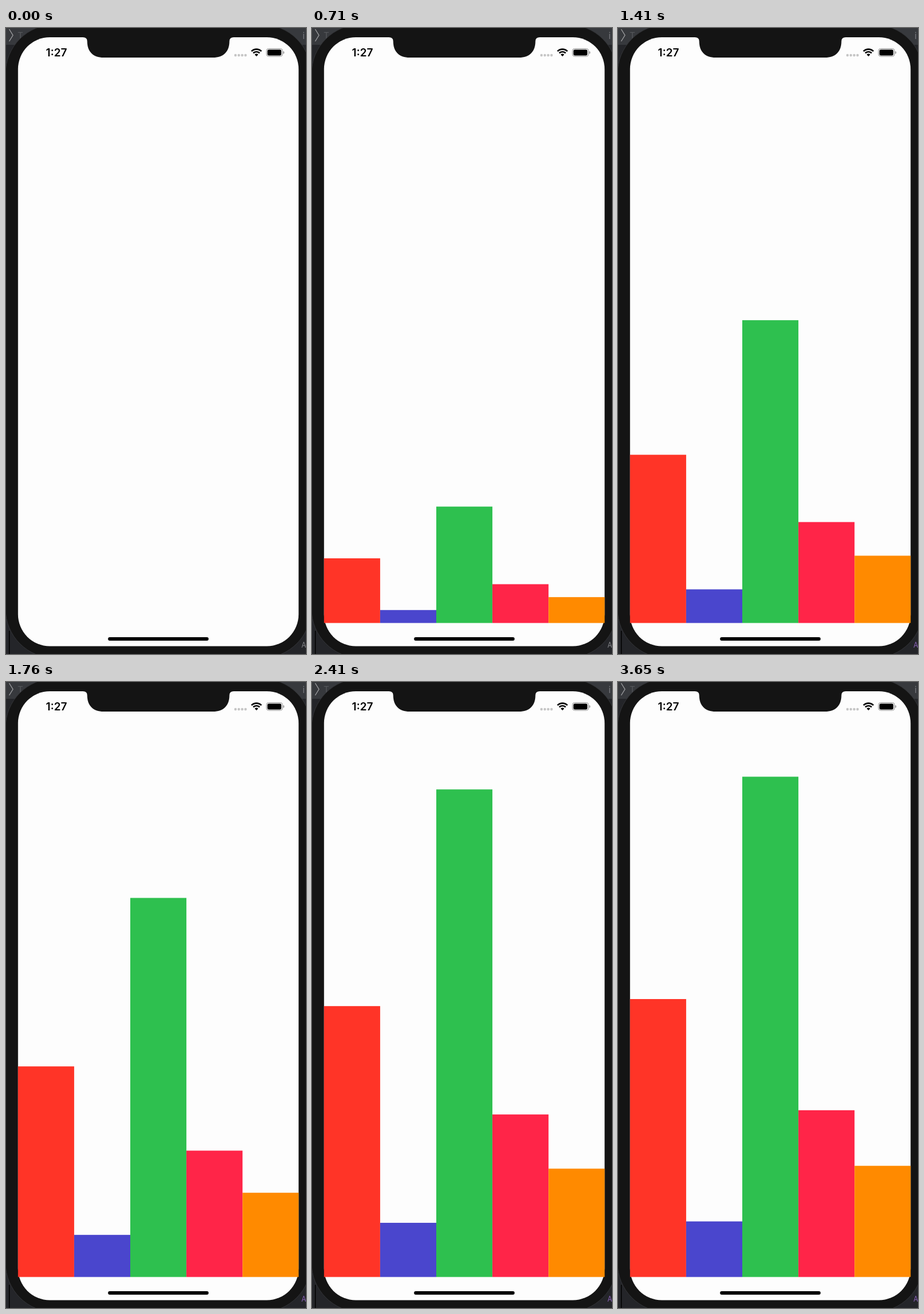
An HTML page with a canvas for the animation above (3.71 s loop, 519x1080 px).

```html
<!DOCTYPE html>
<html lang="en">
<head>
<meta charset="utf-8">
<title>Growing bars</title>
<style>
  html, body { margin: 0; width: 100%; height: 100%; overflow: hidden; background: #141414; }
  canvas { display: block; width: 519px; height: 1080px; }
</style>
</head>
<body>
<canvas id="stage" width="519" height="1080"></canvas>
<script>
const ctx = document.getElementById('stage').getContext('2d');
const LOOP = 3710, STEP = LOOP / 63;
const BASE = 1026.5, UNIT = 95.9, BAR_W = 97.1, LEFT = 20.8;
const GROW = { shown: 60, start: -317, length: 3075 };
const BARS = [
  [5, '#ff3427'], [1, '#4a46cd'], [9, '#2ec04f'], [3, '#ff2548'], [2, '#ff8a00']
];

// Ease-in-out: cubic-bezier(.42, 0, .58, 1)
function ease(x) {
  if (x <= 0) return 0;
  if (x >= 1) return 1;
  let lo = 0, hi = 1;
  for (let i = 0; i < 30; i++) {
    const s = (lo + hi) / 2, r = 1 - s;
    if (1.26 * s * r * r + 1.74 * s * s * r + s * s * s < x) lo = s;
    else hi = s;
  }
  return lo * lo * (3 - 2 * lo);
}

function box(x, y, w, h, r, fill, stroke) {
  ctx.beginPath();
  ctx.roundRect(x, y, w, h, r);
  if (fill) { ctx.fillStyle = fill; ctx.fill(); }
  if (stroke) { ctx.strokeStyle = stroke; ctx.lineWidth = 1; ctx.stroke(); }
}

function label(text, x, y, font, color) {
  ctx.font = font;
  ctx.fillStyle = color;
  ctx.fillText(text, x, y);
}

function backdrop(t) {
  ctx.fillStyle = '#242529';
  ctx.fillRect(0, 0, 519, 1080);
  ctx.fillStyle = '#37393d';
  ctx.fillRect(0, 0, 519, 29);
  ctx.strokeStyle = '#a0a1a3';
  ctx.lineWidth = 1.3;
  ctx.beginPath();
  ctx.moveTo(5.5, 2);
  ctx.lineTo(12, 12.5);
  ctx.lineTo(5.5, 23);
  ctx.stroke();
  label('T', 20, 18, '15px Inter, sans-serif', '#55575b');
  label('i', 513, 19, '16px Inter, sans-serif', '#77797d');
  ctx.fillStyle = '#000';
  ctx.fillRect(5, 1040, 1.5, 40);
  label('A', 511, 1069, '14px "Noto Sans Mono", monospace', t < 1240 ? '#77787c' : '#7d5aa6');
}

function screen() {
  box(-1, -6, 529, 1093, 85, '#141414', '#333437');
  box(20.8, 16, 485.4, 1050.5, 55, '#fdfdfd');
  // Notch with flared upper corners
  ctx.fillStyle = '#141414';
  ctx.beginPath();
  ctx.moveTo(133, 15);
  ctx.lineTo(133, 16);
  ctx.quadraticCurveTo(140.5, 16, 140.5, 23);
  ctx.bezierCurveTo(140.5, 41, 151, 51, 169, 51);
  ctx.lineTo(358, 51);
  ctx.bezierCurveTo(376, 51, 386.5, 41, 386.5, 23);
  ctx.quadraticCurveTo(386.5, 16, 394, 16);
  ctx.lineTo(394, 15);
  ctx.fill();
}

function status() {
  label('1:27', 69, 49, '600 18.8px Inter, sans-serif', '#000');
  ctx.fillStyle = '#c6c6c6';
  for (let i = 0; i < 4; i++) {
    ctx.beginPath();
    ctx.arc(397 + i * 5.8, 47, 2.2, 0, 7);
    ctx.fill();
  }
  // Wi-Fi fan
  const mid = -Math.PI / 2;
  ctx.strokeStyle = ctx.fillStyle = '#000';
  ctx.lineWidth = 2.7;
  for (const r of [12.2, 7.8]) {
    ctx.beginPath();
    ctx.arc(433.3, 48.8, r, mid - 0.78, mid + 0.78);
    ctx.stroke();
  }
  ctx.beginPath();
  ctx.moveTo(433.3, 49);
  ctx.arc(433.3, 49, 4.4, mid - 0.78, mid + 0.78);
  ctx.fill();

  box(450.5, 35.5, 28, 13.5, 4, null, '#8f8f8f');
  box(452.2, 37.2, 24.2, 10.2, 2.6, '#000');
  box(479.7, 40, 1.6, 4.6, [0, 2, 2, 0], '#909090');
}

function bars(t) {
  if (t < GROW.shown) return;
  const k = ease((t - GROW.start) / GROW.length);
  BARS.forEach(([n, color], i) => {
    const h = n * UNIT * k;
    ctx.fillStyle = color;
    ctx.fillRect(LEFT + i * BAR_W, BASE - h, BAR_W, h);
  });
}

function draw(now) {
  const t = now % LOOP;
  // Hold each step, with starts rounded to 10 ms
  const startOf = k => Math.round(k * STEP / 10) * 10;
  let k = Math.floor(t / STEP) + 1;
  while (startOf(k) > t) k--;
  const held = startOf(k);
  backdrop(held);
  screen();
  bars(held);
  status();
  box(176.5, 1051, 174, 6, 3, '#000');
}

let origin = null;
function tick(now) {
  if (origin === null) origin = now;
  draw(Math.max(0, now - origin));
  requestAnimationFrame(tick);
}
draw(0);
requestAnimationFrame(tick);
</script>
</body>
</html>
```
